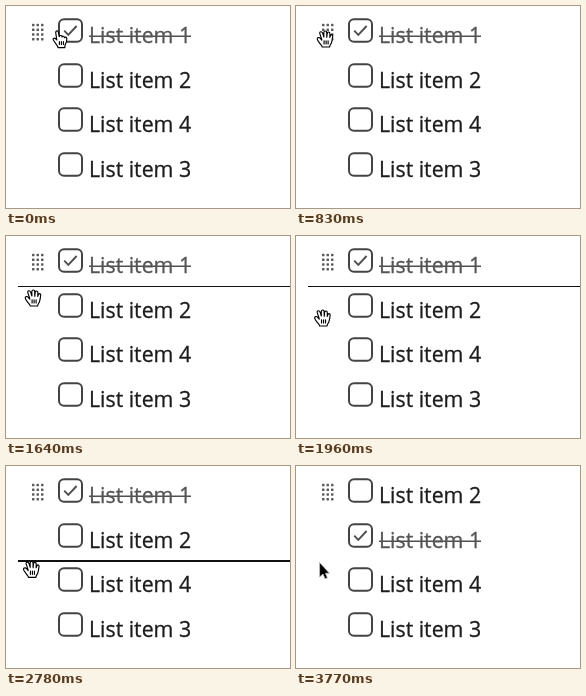
These frames come from a looping animation (284x202 px, 4020 ms). An HTML page:

```html
<!DOCTYPE html>
<html lang="en">
<head>
<meta charset="utf-8">
<title>Reorder a checklist</title>
<style>
  html, body { margin: 0; height: 100%; overflow: hidden; background: #fff; }
  svg { display: block; width: 284px; height: 202px; }
  text { font: 21.33px "Open Sans", "Noto Sans", sans-serif; fill: #1c1c1c; stroke: #1c1c1c; stroke-width: .3; }
  .box { fill: #fff; stroke: #444; stroke-width: 2; }
  .done { fill: none; stroke: #505050; }
  .done ~ text { fill: #555; stroke: #555; }
  .cursor { fill: #fff; stroke: #000; stroke-width: 1.15; stroke-linejoin: round; stroke-linecap: round; }
</style>
</head>
<body>
<svg viewBox="0 0 284 202">
  <g id="dots" fill="#5c5c5c"></g>
  <g id="list"></g>
  <rect id="drop" x="12" width="272" height="1.4" fill="#111" shape-rendering="crispEdges"/>
  <g id="point" class="cursor">
    <path d="M-3.2 1L-4.3-6.3C-4.4-8.6-2-8.8-1.6-6.6L-.8-2.4C-.4-4 2-3.8 2-2C2.5-3.4 4.4-3 4.4-1.3C5-2.4 6.8-2 6.8-.2C6.9 3 5.8 4.6 5 6L4.9 8.6H-2C-2 6.6-5 4-6.6 1.2C-7.7-.9-5.4-2-3.2 1Z"/>
    <path d="M-.6 2.5v3m2-3v3m2-3v3"/>
  </g>
  <g id="grab" class="cursor">
    <path d="M-3.4 0L-5.2-5.4C-5.7-7.5-3.3-8-2.4-6L-1.1-2L-1.2-6.2C-1.1-8.6 1.7-8.6 1.7-6.2L1.8-1.7L2.2-5.6C2.6-7.7 5-7.3 4.9-5L4.8-1.6L5.6-3.6C6.5-5.1 7.9-4.2 7.7-2.7C7.3 .5 7 2 6.4 4C6 5 4.7 6 4.6 8H-2.8C-3 6.3-5 5-6 3.2C-6.8 2-7.8 1.1-7.8-.2C-7.7-1.6-5.8-1.9-4.7-.7L-3.2 1.2Z"/>
    <path d="M-.9 1.8v3.2m2-3.2v3.2m2-3.2v3.2"/>
  </g>
  <path id="arrow" d="M23.6 96.5V111L27 108L29 112.8L31.4 111.8L29.4 107.2H33.4Z" stroke="#bbb" stroke-width=".8"/>
</svg>
<script>
const LOOP = 4020, STEP = 80, DRAG = 910, DROP = 3770, PITCH = 44.6;
const START = [54, 33], ORDER = [1, 2, 4, 3], REORDERED = [2, 1, 4, 3];

// cursor key points: start ms, steps to get there, x, y
const moves = [
  [90, 2, 29, 27], [830, 1, 29, 33], [DRAG, 2, 28.5, 38], [1160, 7, 27, 62],
  [1720, 7, 26, 97], [2280, 3, 26, 106], [2780, 3, 24, 98]
];

const el = id => document.getElementById(id);
const show = (id, on) => el(id).setAttribute("visibility", on ? "visible" : "hidden");
const place = (id, x, y) => el(id).setAttribute("transform", `translate(${x} ${y})`);

for (let i = 0; i < 12; i++) {
  const x = 26 + i % 3 * 4.5, y = 17.8 + Math.floor(i / 3) * 4.7;
  el("dots").innerHTML += `<rect x="${x}" y="${y}" width="2.5" height="2.5" rx=".6"/>`;
}

const checked = `<path class="done" stroke-width="1.9" d="M58.2-.4L62.3 3.8L70.6-5"/>
  <path class="done" stroke-width="1.5" d="M83 5.2H185"/>`;
el("list").innerHTML = ORDER.map(n => `<g id="item${n}">
  <rect class="box" x="53" y="-11.8" width="23" height="22.6" rx="5"/>
  ${n === 1 ? checked : ""}<text x="83" y="12">List item ${n}</text></g>`).join("");

function cursorAt(t) {
  let [x, y] = START;
  for (const [start, steps, toX, toY] of moves) {
    if (t < start) break;
    const k = Math.min(1, (Math.floor((t - start) / STEP) + 1) / steps);
    x += (toX - x) * k;
    y += (toY - y) * k;
  }
  return [x, y];
}

function draw(now) {
  const t = now % LOOP, dropped = t >= DROP, [x, y] = cursorAt(t);
  (dropped ? REORDERED : ORDER).forEach((n, i) => place("item" + n, 0, Math.round(25 + i * PITCH)));

  // the line marks the top of the row under the cursor
  const row = Math.floor((y - 5.6) / 44.3);
  el("drop").setAttribute("y", Math.max(12, 5.6 + row * 44.3));
  show("drop", t >= DRAG && !dropped);

  place("point", x, y);
  place("grab", x, y);
  show("point", t < 170);
  show("grab", t >= 170 && !dropped);
  show("arrow", dropped);
  requestAnimationFrame(draw);
}
draw(0);
</script>
</body>
</html>
```
